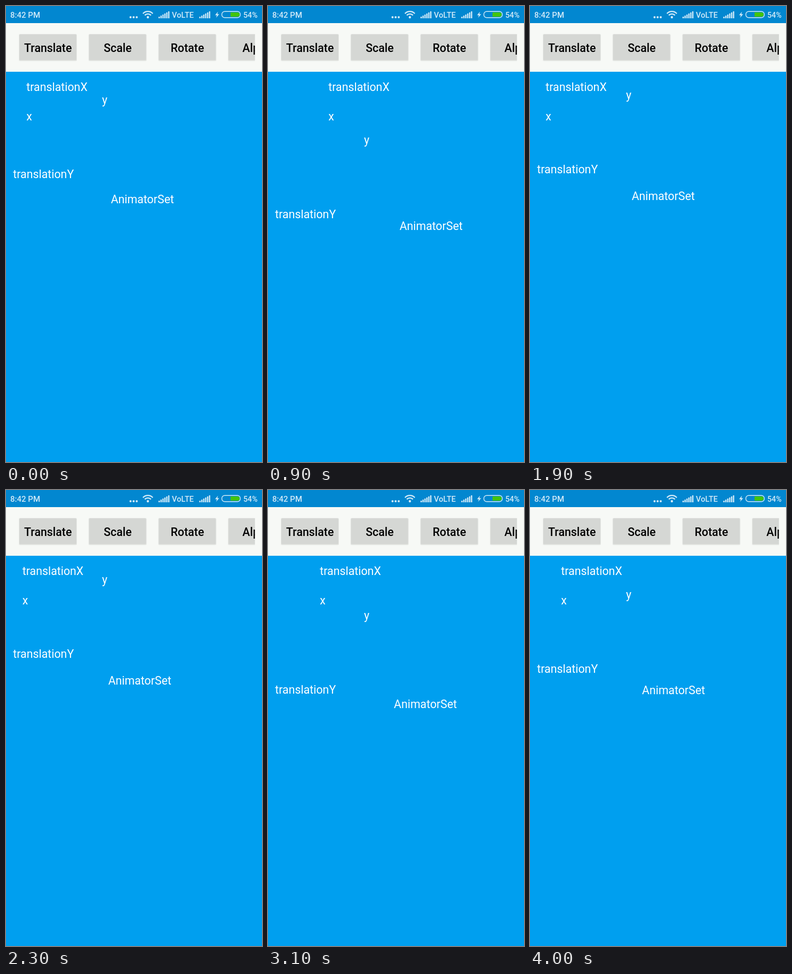
Recreate the animation shown at these times as an HTML page. Size 480x853 px, loop 4100 ms.

```html
<!DOCTYPE html>
<html lang="en">
<head>
<meta charset="utf-8">
<title>Translate animations</title>
<style>
  html, body { margin: 0; width: 100%; height: 100%; overflow: hidden; background: #009fef; }
  svg { display: block; width: 480px; height: 853px; font-family: Roboto, sans-serif; }
  .status { fill: #d2eaf8; font-weight: 500; font-size: 14.67px; }
  .line { fill: none; stroke: #d2eaf8; }
  .button { fill: #d5d7d4; }
  .caption { fill: #000; font-weight: 500; font-size: 21.33px; text-anchor: middle; }
  .label { fill: #fff; font-size: 21.33px; }
</style>
</head>
<body>
<svg viewBox="0 0 480 853">
  <defs>
    <clipPath id="row"><path d="M13 32H466.7V123H13Z"/></clipPath>
    <g id="signal">
      <path d="M0 20h2.4v3H0zM3.6 18h2.4v5H3.6zM7.2 16h2.4v7H7.2zM10.8 14h2.4v9h-2.4zM14.4 12h2.4v11h-2.4zM18 10h2.4v13H18z"/>
    </g>
  </defs>
  <rect width="480" height="853" fill="#009fef"/>
  <rect width="480" height="32" fill="#0287d0"/>
  <rect y="32" width="480" height="91" fill="#f7f9f6"/>

  <g class="status">
    <text x="8" y="22" font-size="15">8:42 PM</text>
    <circle cx="233.5" cy="21" r="2"/>
    <circle cx="239.3" cy="21" r="2"/>
    <circle cx="245.1" cy="21" r="2"/>
    <circle cx="266" cy="21" r="2.2"/>
    <g class="line" stroke-width="2.4">
      <path d="M256.8 14.2A12.5 12.5 0 0 1 275.2 14.2"/>
      <path d="M260.2 17.4A8 8 0 0 1 271.8 17.4"/>
    </g>
    <use href="#signal" x="286"/>
    <text x="311" y="22">VoLTE</text>
    <use href="#signal" x="362.5"/>
    <path d="M397.5 10.5L392 17.2H395.4L394 22L399.6 15.2H396.2Z"/>
    <rect class="line" x="404.7" y="10.2" width="34.6" height="11.6" rx="5.4" stroke-width="1.4"/>
    <path d="M421 12H434a4 4 0 0 1 0 8H421Z" fill="#43c40c"/>
    <text x="445" y="22" font-size="14.2">54%</text>
  </g>

  <g id="buttons" clip-path="url(#row)"></g>
  <g id="labels"></g>
</svg>
<script>
  const LOOP = 4100, STEP = 100;

  // [time in ms, distance in px], linear between entries
  const path = [[0, 25], [900, 100], [1900, 16], [2092, 0], [2700, 51],
                [3100, 84], [3300, 99], [3600, 74.5], [4000, 45]];

  // text, x, baseline, x factor, y factor
  const labels = [
    ['translationX', 13.33, 159, 1, 0],
    ['y', 180, 158, 0, 1],
    ['x', 13.33, 214.3, 1, 0],
    ['translationY', 13.33, 297, 0, 1],
    ['AnimatorSet', 180, 352, 2 / 3, 2 / 3]
  ];

  function add(parent, tag, attrs, text = '') {
    const el = document.createElementNS('http://www.w3.org/2000/svg', tag);
    for (const key in attrs) el.setAttribute(key, attrs[key]);
    el.textContent = text;
    return parent.appendChild(el);
  }

  const row = document.getElementById('buttons');
  ['Translate', 'Scale', 'Rotate', 'Alpha'].forEach((name, i) => {
    const x = 25 + i * 130.7;
    add(row, 'rect', { x: x - 1, y: 52.3, width: 109, height: 51, rx: 2.5, fill: '#e7e9e6' });
    add(row, 'rect', { x, y: 53, width: 107, height: 48.5, rx: 1.5, class: 'button' });
    add(row, 'text', { x: x + 53.7, y: 85.5, class: 'caption' }, name);
  });

  const group = document.getElementById('labels');
  const items = labels.map(([text, x, y]) => add(group, 'text', { x, y, class: 'label' }, text));

  function distance(t) {
    const i = Math.max(1, path.findIndex(p => p[0] >= t));
    const [t0, d0] = path[i - 1], [t1, d1] = path[i];
    return d0 + (d1 - d0) * (t - t0) / (t1 - t0);
  }

  function draw(now) {
    const d = distance(Math.floor(now % LOOP / STEP) * STEP);
    labels.forEach(([, x, y, kx, ky], i) => {
      items[i].setAttribute('x', x + d * kx);
      items[i].setAttribute('y', y + d * ky);
    });
  }

  let start;
  function tick(now) {
    start ??= now;
    draw(now - start);
    requestAnimationFrame(tick);
  }
  draw(0);
  requestAnimationFrame(tick);
</script>
</body>
</html>
```
